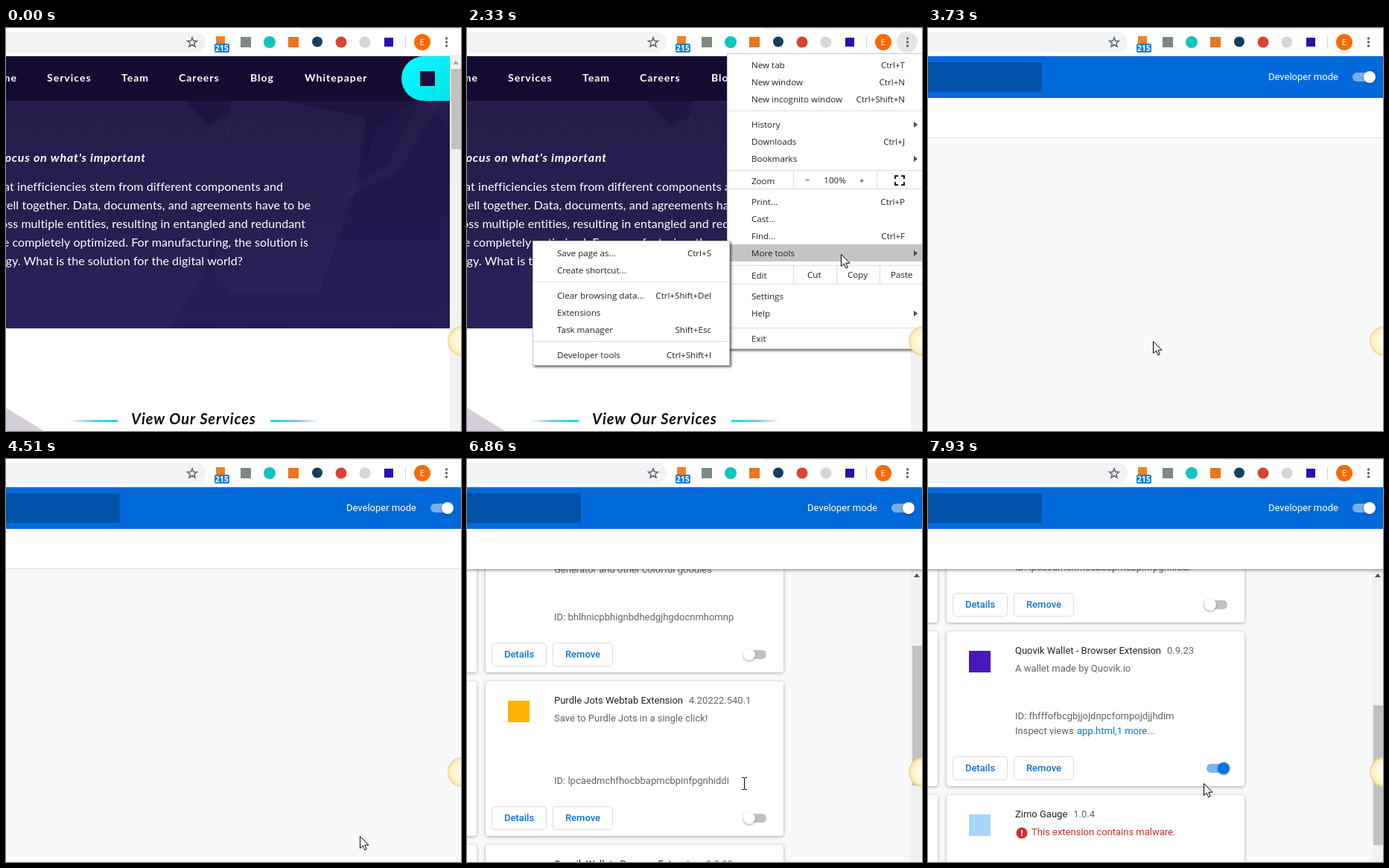
An HTML page with a canvas for the animation above (8000 ms loop, 611 by 542 pixels).

```html
<!DOCTYPE html>
<html lang="en">
<head>
<meta charset="utf-8">
<title>Opening the extensions page</title>
<style>
html, body { margin: 0; width: 100%; height: 100%; overflow: hidden; background: #fff; }
canvas { display: block; }
</style>
</head>
<body>
<canvas id="stage" width="611" height="542"></canvas>
<script>
const ctx = document.getElementById('stage').getContext('2d');
const W = 611, H = 542, LOOP = 8000;
const SITE = 'Lato, sans-serif', MENU = '11.6px "Open Sans", sans-serif', CARD = '13px Roboto, sans-serif';

const STEP = { press: 6, menu: 7, submenu: 15, closed: 21, extensions: 23, cards: 39 };
const stepAt = t => t < 130 ? 0 : Math.floor((t - 130) / 156) + 1;

// [step, x, y]
const CURSOR = [
  [1, 541, 530], [3, 556, 370], [5, 580, 80], [6, 587, 22], [7, 587, 22],
  [9, 589, 70], [11, 562, 190], [13, 510, 290], [14, 502, 304], [15, 502, 304],
  [17, 330, 303], [19, 244, 360], [20, 236, 383], [21, 235, 390], [23, 262, 402],
  [28, 460, 497], [29, 475, 507], [30, 493, 526], [33, 334, 241], [35, 461, 409],
  [36, 459, 408], [39, 459, 408], [40, 410, 425], [41, 410, 425], [42, 370, 436], [51, 370, 436]
];
const SCROLL = [[41, 0], [42, 110], [44, 313], [46, 460], [47, 500], [49, 500], [51, 600]];

function track(keys, n) {
  if (n <= keys[0][0]) return keys[0].slice(1);
  const i = keys.findIndex(k => k[0] >= n);
  if (i < 0) return keys[keys.length - 1].slice(1);
  const a = keys[i - 1], b = keys[i], p = (n - a[0]) / (b[0] - a[0]);
  return a.slice(1).map((v, j) => v + (b[j + 1] - v) * p);
}

function rect(x, y, w, h, color) {
  ctx.fillStyle = color;
  ctx.fillRect(x, y, w, h);
}
function round(x, y, w, h, r, color) {
  ctx.beginPath();
  ctx.roundRect(x, y, w, h, r);
  ctx.fillStyle = color;
  ctx.fill();
}
function circle(x, y, r, color) {
  ctx.beginPath();
  ctx.arc(x, y, r, 0, Math.PI * 2);
  ctx.fillStyle = color;
  ctx.fill();
}
function poly(points, color) {
  ctx.beginPath();
  points.forEach(p => ctx.lineTo(...p));
  ctx.closePath();
  ctx.fillStyle = color;
  ctx.fill();
}
function text(s, x, y, font, color, align = 'left', spacing = 0) {
  ctx.font = font;
  ctx.letterSpacing = spacing + 'px';
  ctx.textAlign = align;
  ctx.fillStyle = color;
  ctx.fillText(s, x, y);
}
function gradient(x0, y0, x1, y1, ...colors) {
  const g = ctx.createLinearGradient(x0, y0, x1, y1);
  colors.forEach((c, i) => g.addColorStop(i / (colors.length - 1), c));
  return g;
}
function shadowed(color, blur, dx, dy, draw) {
  ctx.save();
  ctx.shadowColor = color;
  ctx.shadowBlur = blur;
  ctx.shadowOffsetX = dx;
  ctx.shadowOffsetY = dy;
  draw();
  ctx.restore();
}

function browserBar(n) {
  rect(0, 0, W, 38, '#fff');
  rect(397, 0, W - 397, 1, '#dee1e6');
  rect(0, 37, W, 1, '#e3e4e7');
  round(-40, 5, 308, 28, 14, '#f1f3f4');

  ctx.beginPath();
  for (let i = 0; i < 10; i++) {
    const a = -Math.PI / 2 + i * Math.PI / 5, r = i % 2 ? 2.9 : 6.8;
    ctx.lineTo(250 + r * Math.cos(a), 19.6 + r * Math.sin(a));
  }
  ctx.closePath();
  ctx.strokeStyle = '#5f6368';
  ctx.lineWidth = 1.5;
  ctx.stroke();

  rect(282, 11, 12, 12, '#f58220');
  round(280, 21, 20, 12, 2, '#1a7fd4');
  text('215', 290, 31, 'bold 10px "Open Sans", sans-serif', '#fff', 'center', 0.3);
  rect(315, 12, 14, 14, '#7d8a7f');
  circle(354, 19, 8, '#12c4bd');
  rect(379, 12, 14, 14, '#e8761f');
  circle(418, 18.5, 7, '#12405f');
  circle(450, 19, 7.5, '#d8442f');
  circle(482, 19, 7.5, '#d5d7d6');
  rect(508, 13, 12, 12, '#2613b0');
  rect(536, 11, 1, 16, '#d0d2d6');
  circle(559, 19, 11, '#fa6a00');
  text('E', 559, 23, '11px Roboto, sans-serif', '#fff', 'center');
  if (n >= STEP.press && n < STEP.extensions) circle(591, 19, 14, '#e4e5e7');
  for (const y of [14, 19, 24]) circle(591.5, y, 1.7, '#5f6368');
}

function scrollbar(top, thumbY, thumbH, arrow) {
  rect(596, top, 15, H - top, '#f1f1f1');
  poly([[600, top + 11], [608, top + 11], [604, top + 6]], arrow);
  rect(598, thumbY, 13, thumbH, '#c1c1c1');
}

function hero() {
  rect(0, 98, 596, 306, gradient(0, 98, 0, 404, '#211747', '#22194c', '#251c58'));
  const light = 'rgba(255,255,255,.025)', dark = 'rgba(10,2,40,.14)';
  ctx.save();
  ctx.beginPath();
  ctx.rect(0, 98, 596, 306);
  ctx.clip();
  poly([[42, 98], [240, 98], [274, 131], [302, 118], [290, 215], [268, 330], [218, 404], [0, 404], [0, 98]], light);
  poly([[240, 98], [302, 98], [274, 131]], dark);
  poly([[302, 98], [372, 98], [483, 120], [470, 215], [420, 358], [305, 358], [278, 330]], light);
  poly([[372, 98], [545, 98], [497, 135], [483, 180], [483, 120]], dark);
  poly([[556, 98], [584, 98], [527, 195], [452, 230], [470, 208], [512, 185]], light);
  poly([[596, 98], [565, 98], [596, 135]], light);
  ctx.restore();
}

function sitePage() {
  rect(0, 38, W, H - 38, '#fff');
  hero();
  rect(0, 38, 596, 60, '#150a31');
  const nav = { Services: 55, Team: 155, Careers: 232, Blog: 328, Whitepaper: 401 };
  const navFont = 'bold 14px ' + SITE;
  text('Home', 15, 72, navFont, '#fff', 'right', 1);
  for (const label in nav) text(label, nav[label], 72, navFont, '#fff', 'left', 1);
  round(531, 38, 66, 60, [30, 0, 0, 30], gradient(531, 38, 596, 98, '#00ffff', '#00e2ea'));
  rect(556, 58, 20, 20, '#1a0f3c');

  text("focus on what's important", 188, 180, 'italic bold 16px ' + SITE, '#fff', 'right', 0.8);
  [
    ['that inefficiencies stem from different components and', 372],
    ['well together. Data, documents, and agreements have to be', 409],
    ['across multiple entities, resulting in entangled and redundant', 402],
    ['be completely optimized. For manufacturing, the solution is', 406],
    ['technology. What is the solution for the digital world?', 318]
  ].forEach(([line, right], i) => text(line, right, 219 + i * 25, '16px ' + SITE, '#fff', 'right', 0.08));

  poly([[0, 511], [51, 542], [0, 542]], '#d3ced9');
  rect(85, 527, 65, 3, gradient(85, 0, 150, 0, 'rgba(100,190,240,0)', '#6cc4ee', '#00e8f2'));
  rect(355, 527, 65, 3, gradient(355, 0, 420, 0, '#00e8f2', '#7fbdec', 'rgba(100,170,240,0)'));
  text('View Our Services', 168, 533, 'italic bold 20px ' + SITE, '#0a0a14', 'left', 0.9);
  scrollbar(38, 55, 108, '#a3a3a3');
}

function panel(x, y, w, h) {
  shadowed('rgba(50,65,55,.8)', 3, 2, 2, () => rect(x, y, w, h, '#fff'));
  ctx.strokeStyle = '#c9c9cb';
  ctx.lineWidth = 1;
  ctx.strokeRect(x + 0.5, y + 0.5, w - 1, h - 1);
}
function menuText(s, x, y, align) {
  text(s, x, y + 4, MENU, '#202124', align);
}
function menuRows(rows, x, w, textX, keyX, active) {
  for (const [label, y, key] of rows) {
    if (active(label, y)) rect(x + 1, y - 12, w - 2, 23, '#c4c4c6');
    menuText(label, textX, y);
    if (key === '>') poly([[600, y - 4], [600, y + 4], [605, y]], '#4a4a4d');
    else if (key) menuText(key, keyX, y, 'right');
  }
}
const inRow = (cy, y) => cy >= y - 12 && cy < y + 11;

function mainMenu(cx, cy, submenuOpen) {
  panel(349, 34, 270, 398);
  menuRows([
    ['New tab', 50, 'Ctrl+T'], ['New window', 73, 'Ctrl+N'], ['New incognito window', 96, 'Ctrl+Shift+N'],
    ['History', 130, '>'], ['Downloads', 153, 'Ctrl+J'], ['Bookmarks', 176, '>'], ['Zoom', 206],
    ['Print...', 234, 'Ctrl+P'], ['Cast...', 257], ['Find...', 280, 'Ctrl+F'], ['More tools', 303, '>'],
    ['Edit', 333], ['Settings', 361], ['Help', 384, '>'], ['Exit', 418]
  ], 349, 264, 382, 588, (label, y) => submenuOpen ? label === 'More tools'
    : label !== 'Zoom' && cx > 349 && inRow(cy, y));
  for (const y of [111, 191, 216, 319, 344, 403]) rect(350, y, 261, 1, '#dcdcde');
  for (const x of [438, 550]) rect(x, 192, 1, 24, '#dcdcde');
  for (const x of [438, 496, 554]) rect(x, 320, 1, 24, '#dcdcde');
  menuText('−', 457, 205, 'center');
  menuText('100%', 494, 205, 'center');
  menuText('+', 530, 205, 'center');
  menuText('Cut', 457, 332);
  menuText('Copy', 511, 332);
  menuText('Paste', 569, 332);
  ctx.strokeStyle = '#202124';
  ctx.lineWidth = 2;
  for (const sx of [-1, 1]) for (const sy of [-1, 1]) {
    ctx.beginPath();
    ctx.moveTo(581 + sx * 2, 205 + sy * 6);
    ctx.lineTo(581 + sx * 6, 205 + sy * 6);
    ctx.lineTo(581 + sx * 6, 205 + sy * 2);
    ctx.stroke();
  }
}

function toolsMenu(cx, cy) {
  panel(88, 286, 265, 168);
  menuRows([
    ['Save page as...', 303, 'Ctrl+S'], ['Create shortcut...', 326],
    ['Clear browsing data...', 360, 'Ctrl+Shift+Del'], ['Extensions', 383], ['Task manager', 406, 'Shift+Esc'],
    ['Developer tools', 440, 'Ctrl+Shift+I']
  ], 88, 265, 121, 328, (label, y) => cx < 352 && inRow(cy, y));
  for (const y of [341, 421]) rect(89, y, 263, 1, '#dcdcde');
}

const ROWS = [
  { name: 'Tabbin Sorter', version: '2.1.0', lines: ['Keeps open tabs in order'], id: 'kdmopaflgbcnheijkolmpadgfhbceinj', icon: '#7aa7d9' },
  { name: 'Huvio Picker', version: '0.6', lines: ['Eyedropper, Color Picker, Gradient', 'Generator and other colorful goodies'], id: 'bhlhnicpbhignbdhedgjhgdocnmhomnp', icon: '#8d9aa5' },
  { name: 'Purdle Jots Webtab Extension', version: '4.20222.540.1', lines: ['Save to Purdle Jots in a single click!'], id: 'lpcaedmchfhocbbapmcbpinfpgnhiddi', icon: '#ffb300' },
  { name: 'Quovik Wallet - Browser Extension', version: '0.9.23', lines: ['A wallet made by Quovik.io'], id: 'fhfffofbcgbjjojdnpcfompojdjjhdim', icon: '#4a17bd', on: true },
  { name: 'Zimo Gauge', version: '1.0.4', warning: 'This extension contains malware.', lines: [], icon: '#a9d5fa' }
];

function cardBase(x, y) {
  shadowed('rgba(60,64,67,.45)', 4, 0, 1, () => round(x, y, 400, 208, 4, '#fff'));
}
function button(label, x, y, w) {
  ctx.beginPath();
  ctx.roundRect(x + 0.5, y + 0.5, w - 1, 31, 4);
  ctx.strokeStyle = '#dadce0';
  ctx.lineWidth = 1;
  ctx.stroke();
  text(label, x + w / 2, y + 20, '500 ' + CARD, '#0b72d9', 'center');
}
function toggle(x, y, on, bar, knob) {
  round(x, y - 6, 28, 12, 6, bar);
  shadowed('rgba(0,0,0,.4)', 3, 0, 1, () => circle(on ? x + 23 : x + 5, y, 8, knob));
}

function card(row, y) {
  const gray = '#5f6368';
  cardBase(-387, y);
  cardBase(25, y);
  rect(55, y + 26, 29, 29, row.icon);
  text(row.name, 117, y + 30, CARD, '#202124');
  text(row.version, 125 + ctx.measureText(row.name).width, y + 30, CARD, gray);
  row.lines.forEach((line, i) => text(line, 117, y + 54 + i * 20, CARD, gray));
  if (row.warning) {
    circle(126, y + 51, 7.5, '#d92b2b');
    rect(125, y + 47, 2, 5, '#fff');
    rect(125, y + 53, 2, 2, '#fff');
    text(row.warning, 139, y + 54, CARD, '#c9302c');
  }
  if (row.id) text('ID: ' + row.id, 117, y + (row.on ? 118 : 138), CARD, gray);
  if (row.on) {
    text('Inspect views ', 117, y + 138, CARD, gray);
    text('app.html,1 more...', 200, y + 138, CARD, '#0b72d9');
  }
  button('Details', 33, y + 168, 74);
  button('Remove', 115, y + 168, 81);
  toggle(374, y + 184, row.on, row.on ? '#7db4f0' : '#bdc1c6', row.on ? '#0a73e6' : '#fff');
}

const cardTop = (i, scroll) => 172 + i * 220 - scroll;

function extensionsPage(n, scroll) {
  rect(0, 38, W, H - 38, '#f8f9fb');
  if (n >= STEP.cards) {
    ROWS.forEach((row, i) => {
      const y = cardTop(i, scroll);
      if (y > -220 && y < H) card(row, y);
    });
    scrollbar(148, 164 + scroll / 3.5875, 188, '#505050');
  }
  if (scroll > 0) shadowed('rgba(0,0,0,.5)', 5, 0, 1, () => rect(-9, 94, W + 18, 54, '#fff'));
  else {
    rect(0, 94, W, 53, '#fff');
    rect(0, 147, W, 1, '#dcdee2');
  }
  rect(0, 38, W, 56, '#0069d9');
  round(-10, 46, 163, 40, 2, '#0052a8');
  text('Developer mode', 457, 70, CARD, '#fff');
  toggle(570, 66, true, '#79aeea', '#fff');
}

function bubble() {
  const g = ctx.createRadialGradient(613, 421, 6, 613, 421, 20);
  g.addColorStop(0, '#fffbe6');
  g.addColorStop(0.75, '#fdf0c2');
  g.addColorStop(1, '#f3cf86');
  circle(613, 421, 20, g);
}

function arrow(x, y) {
  ctx.save();
  ctx.translate(x + 0.5, y + 0.5);
  poly([[0, 0], [0, 16], [3.8, 12.6], [6.3, 18.4], [8.8, 17.3], [6.3, 11.7], [11.5, 11.7]], '#fff');
  ctx.strokeStyle = '#000';
  ctx.lineWidth = 1;
  ctx.stroke();
  ctx.restore();
}
function textCursor(x, y) {
  rect(x, y - 7, 1, 15, '#000');
  for (const dy of [-8, 8]) {
    rect(x - 3, y + dy, 3, 1, '#000');
    rect(x + 1, y + dy, 3, 1, '#000');
  }
}

function draw(n) {
  const [cx, cy] = track(CURSOR, n).map(Math.round);
  const [scroll] = track(SCROLL, n).map(Math.round);
  const menuOpen = n >= STEP.menu && n < STEP.closed;
  const submenuOpen = menuOpen && n >= STEP.submenu;

  if (n < STEP.extensions) sitePage();
  else extensionsPage(n, scroll);
  browserBar(n);
  if (menuOpen) mainMenu(cx, cy, submenuOpen);
  if (submenuOpen) toolsMenu(cx, cy);
  bubble();

  const overText = n >= STEP.cards && cx < 400 && ROWS.some((row, i) => {
    const dy = cy - cardTop(i, scroll);
    return dy > 12 && dy < 150;
  });
  if (overText) textCursor(cx + 2, cy);
  else if (n > 0) arrow(cx, cy);
}

function tick() {
  draw(stepAt(performance.now() % LOOP));
  requestAnimationFrame(tick);
}
tick();
</script>
</body>
</html>
```
